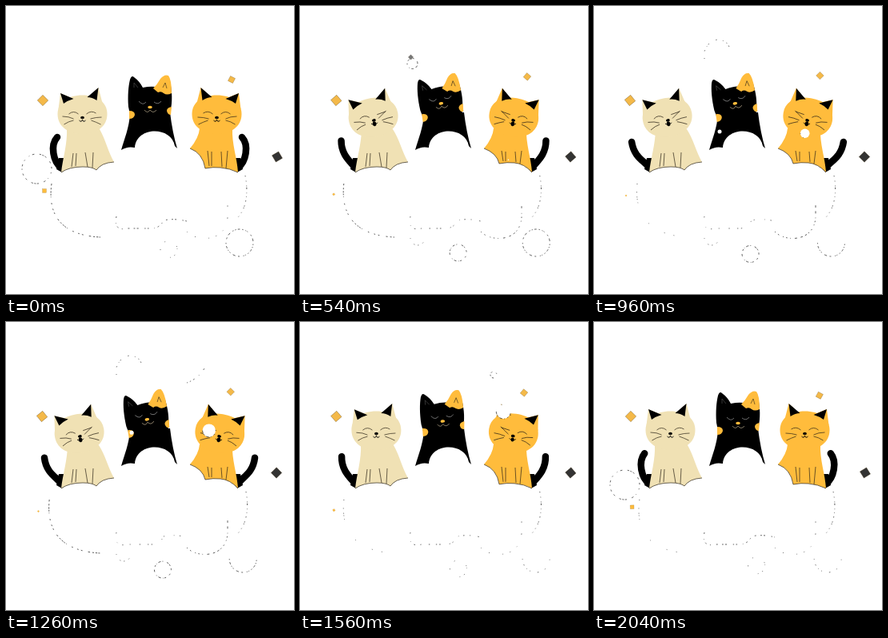
Write an HTML page with a canvas that moves like this. It is 360 by 360 pixels and loops after 2070 ms.

```html
<!DOCTYPE html>
<html lang="en">
<head>
<meta charset="utf-8">
<title>Three cats</title>
<style>
html, body { margin: 0; width: 100%; height: 100%; overflow: hidden; background: #fff; }
canvas { display: block; width: 360px; height: 360px; }
</style>
</head>
<body>
<canvas id="stage" width="360" height="360"></canvas>
<script>
const c = document.getElementById('stage').getContext('2d');
const LOOP = 2070, STEP = 30;
const CREAM = '#f0e1b4', ORANGE = '#ffbc3c', BLACK = '#000', INK = '#2b2418';

const mix = (a, b, u) => a + (b - a) * u;
function ease(t, from, to) {
  const u = Math.min(1, Math.max(0, (t - from) / (to - from)));
  return u * u * (3 - 2 * u);
}
// Rises between a and b, falls between d and e
const pulse = (t, a, b, d, e) => ease(t, a, b) - ease(t, d, e);

function fill(d, color) {
  c.fillStyle = color;
  c.fill(new Path2D(d));
}
function line(d, color = INK, width = 0.7) {
  c.strokeStyle = color;
  c.lineWidth = width;
  c.stroke(new Path2D(d));
}
function oval(x, y, rx, ry, color) {
  c.fillStyle = color;
  c.beginPath();
  c.ellipse(x, y, rx, ry, 0, 0, 7);
  c.fill();
}
function group(draw) {
  c.save();
  draw();
  c.restore();
}
const mirrored = draw => group(() => {
  c.translate(359, 0);
  c.scale(-1, 1);
  draw();
});

function diamond(x, y, r, color, turn = 0) {
  group(() => {
    c.translate(x, y);
    c.rotate(Math.PI / 4 + turn);
    const s = r * 1.36;
    c.fillStyle = color;
    c.fillRect(-s / 2, -s / 2, s, s);
    c.strokeStyle = 'rgba(60,40,0,.5)';
    c.lineWidth = r / 12;
    c.strokeRect(-s / 2, -s / 2, s, s);
  });
}

function tail(q) {
  const p = (ax, ay, bx, by) => mix(ax, bx, q) + ',' + mix(ay, by, q);
  c.lineCap = 'round';
  line(`M69,202 C${p(59, 195, 64, 194)} ${p(55, 174, 50, 190)} ${p(64, 164, 47, 170)}`, BLACK, 8.5);
  c.lineCap = 'butt';
  fill('M70,208 L63,204 L66,190 L74,190 Z', BLACK);
}

function sideHead(tilt, color) {
  group(() => {
    c.translate(95.5 - 4 * tilt, 134 + 3.5 * tilt);
    c.rotate(-0.16 * tilt);
    fill('M-27.5,-25 L-30,-5 L-10,-18 Z M20,-32 L5,-18 L26,-9 Z', color);
    fill('M-31,1 C-31,-14 -18,-22.5 0,-22.5 C18,-22.5 31,-14 31,1 C31,17 17,26 0,26 C-17,26 -31,17 -31,1 Z', color);
    fill('M-27.5,-25 L-11,-18 Q-18,-16 -23.5,-12 Z', BLACK);
    fill('M20,-32 L6,-20 Q12,-20 18,-16 Z', BLACK);
    line('M-17,1 Q-11,-4 -5,1');
    line(tilt > 0.5 ? 'M5,-1 L16,-3 M6,4 L17,-4' : 'M5,1 Q11,-4 17,0');
    line('M-25,4 Q-17,4 -11,7 M-23,14 Q-17,10 -11,9 M10,7 Q17,5 24,5 M11,9 Q17,11 23,14');
    oval(0, 5.5, 2.4, 1.8, BLACK);
    line('M-4,9 Q-1,12 0,8 Q1,12 4,9', BLACK, 0.9);
    oval(0, 10, 2.3 * tilt, 2.8 * tilt, BLACK);
  });
}

function leftCat(tilt, q) {
  tail(q);
  const edge = 'Q79,201 96,201 Q108,201 113,205 Q119,196 135,195';
  fill(`M${76 + tilt},153 C77,172 71,190 69,208 ${edge} C128,183 124,166 ${117 - tilt},154 Z`, CREAM);
  line('M69,208 ' + edge);
  line('M84,184 L82,201 M88,184 L87,200 M99,183 L102,201 M109,183 L108,202');
  sideHead(tilt, CREAM);
}

function rightCat(tilt, q, lift) {
  mirrored(() => tail(q));
  const z = 203 - 6 * lift;
  const edge = `Q246,184 249,${z} Q259,${z - 2} 268,${z - 1} Q280,${z} 290,208`;
  fill(`M242,153 Q241,165 230,178 ${edge} C289,190 282,172 283,153 Z`, ORANGE);
  line('M230,178 ' + edge);
  line(`M252,181 L254,${z - 3} M257,182 V${z - 3} M269,182 L270,${z - 2} M277,181 L275,${z}`);
  mirrored(() => sideHead(tilt, ORANGE));
}

function midCat(tilt) {
  fill('M155,135 C154,152 148,166 144,180 Q152,175 161,177 C163,150 207,150 211,175 L214,178 Q208,158 205,133 Z', BLACK);
  group(() => {
    c.translate(180, 145);
    c.rotate(-0.157 * tilt);
    c.translate(-180, -145);
    fill('M153,126 C152,112 153,100 155,92 Q157,86 160,89 Q167,94 171,102 Q180,100 187,101 L206,100 C208,112 208,124 204,138 Q180,156 156,140 Z', BLACK);
    fill('M184,103 Q189,98 193,91 Q198,85 203,87 Q207,92 207,109 Q201,112 197,109 Q194,106 190,108 Z', ORANGE);
    line('M196,102 L199,96 L201,103', INK, 0.6);
    line('M160,102 L160,96 L165,102', '#555', 0.6);
    fill('M154,131 Q161,131 161,136 Q160,141 154,141 Z', ORANGE);
    fill('M207,126 Q201,127 201,131 Q202,136 206,136 Z', ORANGE);
    c.translate(0, -5 * tilt);
    line('M166,119 Q171,125 175,120 M185,120 Q190,124 194,119', '#999');
    oval(180, 126.5, 2.8, 1.8, ORANGE);
    line('M173,130 Q177,135 180,130 Q184,135 188,130', '#b5a68a');
  });
}

// Broken outline with seeded dash lengths; cover is the share of ink
function sketch(d, cover, seed) {
  if (cover < 0.03) return;
  const dashes = Array.from({ length: 16 }, (_, i) => {
    const r = Math.abs(Math.sin(seed * 91.7 + i * 12.99) * 43758.5) % 1;
    return i % 2 ? 1 + 5 * r / cover * 0.5 : 0.6 + 5 * r * cover;
  });
  c.setLineDash(dashes);
  line(d, '#333', 0.8);
  c.setLineDash([]);
}
const ring = (x, y, r) => `M${x - r},${y} a${r},${r} 0 1 0 ${2 * r},0 a${r},${r} 0 1 0 ${-2 * r},0`;
const bowl = (x, y, r) => `M${x - r},${y} a${r},${r} 0 0 0 ${2 * r},0`;

function cloud(t, arch) {
  const fade = 1 - ease(t, 1260, 1560);
  sketch(`M${57 - 3 * arch},222 C${53 - 2 * arch},252 60,286 118,289`, 0.08 + 0.3 * Math.cos(t / 200) ** 2 * fade, 1);
  sketch(`M${299 + arch},212 C${303 + arch},232 301,252 290,264`, 0.4, 2);
  sketch('M226,282 C238,295 275,296 277,264 V248', 0.15 + 0.4 * arch * fade, 3);
  sketch('M138,263 Q134,282 152,278 H182 Q192,278 197,268 Q210,265 226,269', 0.3 - 0.15 * arch, 4);
  sketch(bowl(147, 290, 9), 0.25 * pulse(t, 90, 400, 1260, 1560), 5);
  sketch(ring(38.5, 203.5, 18.5), 0.4 * (1 - pulse(t, 270, 540, 1500, 2040)), 6);
  sketch((t > 750 ? bowl : ring)(292 + 4.5 * arch, 296, 17), 0.2 + 0.4 * fade, 7);
  sketch(ring(203.5 - 8 * arch, 304 + 6 * arch, 10.5), 0.15 + 0.5 * arch * fade, 8);
}

function puffs(t) {
  const show = pulse(t, 60, 240, 600, 780);
  sketch(ring(140.5, 72, 6.5), 0.5 * show, 9);
  diamond(138.5, 64, 3.4 * show, '#777');
  sketch('M138,66 V57 Q143,43 155,42 Q168,43 170,55', 0.25 * pulse(t, 660, 960, 1260, 1500), 10);
  sketch('M226,76 Q240,71 248,58', 0.3 * pulse(t, 960, 1200, 1300, 1500), 11);
  sketch(ring(242, 66, 4), 0.4 * pulse(t, 1380, 1560, 1580, 1740), 12);
}

function bubbles(t) {
  const age = (t - 480) / 1080;
  if (age <= 0) return;
  const x = 259 + 7 * Math.cos(Math.PI * (t - 800) / 600);
  const y = 197 - 85 * age;
  const r = 9 * Math.sin(Math.PI / 2 * Math.min(1, age));
  oval(x, y, r, r, '#fff');
  sketch(bowl(x, y, r), 0.7 * pulse(t, 900, 1260, 1560, 1740), 13);
  const s = 2.5 * pulse(t, 780, 960, 1260, 1400);
  oval(157, 217 - t / 16, s, s, '#fff');
}

function sparks(arch, wave) {
  diamond(46 - arch, 118, 7, '#f4b949', 0.1 * arch);
  diamond(282 + 2 * wave, 92 - 5 * arch, 5, '#f4b949', -0.3 + 0.3 * arch);
  diamond(339 - arch, 188.5, 7, '#333', 0.25 - 0.25 * arch);
  diamond(48 - 8 * arch, 231 + 6 * arch, 3.6 - 2.4 * arch, ORANGE, Math.PI / 4 * (1 - arch));
}

function draw(t) {
  const arch = Math.sin(Math.PI * t / LOOP);
  const wave = Math.sin(2 * Math.PI * t / LOOP);
  const nod = pulse(t, 0, 240, 1290, 1590);
  c.fillStyle = '#fff';
  c.fillRect(0, 0, 360, 360);
  cloud(t, arch);
  leftCat(nod, arch);
  rightCat(pulse(t, 150, 510, 1470, 1890), arch, nod);
  midCat(pulse(t, 150, 540, 1290, 1830));
  bubbles(t);
  puffs(t);
  sparks(arch, wave);
}

const start = performance.now();
function tick() {
  const t = (performance.now() - start) % LOOP;
  draw(Math.floor(t / STEP) * STEP);
  requestAnimationFrame(tick);
}
tick();
</script>
</body>
</html>
```
